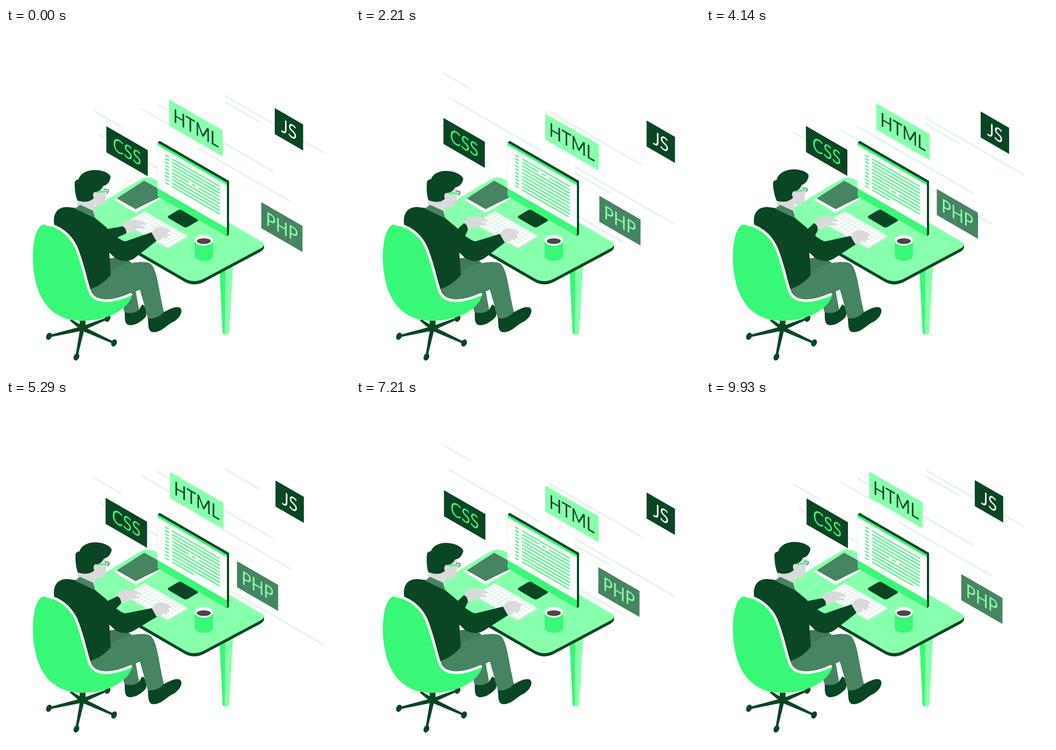
Animation, 640 px wide and 640 px high, one loop 10000 ms. Source, as an HTML page:

```html
<!DOCTYPE html>
<html lang="en">
<head>
<meta charset="utf-8">
<title>Developer at work</title>
<style>
  html, body { margin: 0; width: 100%; height: 100%; overflow: hidden; background: #fff; }
  svg { display: block; width: 100vw; height: 100vh; }
  text { font: 35px Lato, sans-serif; text-anchor: middle; }
  .dark { fill: #0a4524; }
  .mid { fill: #478461; }
  .green { fill: #38f877; }
  .light { fill: #88ffad; }
  .skin { fill: #dadada; }
  .white { fill: #fff; }
  .rail { fill: #e6f4ed; }
</style>
</head>
<body>
<svg viewBox="0 0 640 640">
  <g id="rails"></g>
  <g id="boards"></g>

  <g id="desk">
    <path class="green" d="M397 446 L403 568 Q409 572 415 568 L422 440Z"/>
    <path class="light" d="M408 446 L407 570 Q412 571 415 568 L422 440Z"/>
    <path class="dark" d="M480 404 V409 Q479 413 472 417 L367 473 Q350 481 334 473 L150 367 V350 L300 420Z"/>
    <path class="light" d="M478 399 Q483 406 472 411 L367 467 Q350 475 334 467 L150 360 V342 L250 282 Q262 275 276 281Z"/>
    <path class="white" d="M200 319 L241 344 L300 310 L262 288Z"/>
    <path class="mid" d="M206 317 L257 284 L300 308 L241 337Z"/>
  </g>

  <g id="monitor">
    <path class="dark" d="M303 349 L320 339 Q324 337 328 339 L356 356 Q359 358 355 360 L338 370 Q334 372 330 370 L303 354 Q299 351 303 349Z"/>
    <path class="dark" d="M282 213 L286 210 L415 284.500 V384 L411 387.500Z"/>
    <g transform="matrix(1 .577 0 1 282 213)">
      <rect class="green" width="129" height="100"/>
      <rect class="white" y="5" width="129" height="80"/>
      <path d="M-.3 5V85" stroke="#e0e8e3" stroke-width=".7"/>
      <path id="code" fill="none" stroke="#38f877" stroke-width="2.300"/>
    </g>
  </g>

  <g id="keyboard">
    <path d="M222 363 L258 342 L337 387 V390 L301 411 L222 366Z" fill="#d5eadd"/>
    <path class="white" d="M222 363 L258 341 L337 386.500 L301 408Z"/>
    <path id="keys" fill="none" stroke="#dcefe4" stroke-width="1.300"/>
  </g>

  <g id="mug">
    <path class="green" d="M351 395 V424 C351 436 385 436 385 424 V395Z"/>
    <ellipse class="white" cx="368" cy="395" rx="17" ry="10"/>
    <ellipse cx="368" cy="396.500" rx="13" ry="5.200" fill="#4b4545"/>
  </g>

  <path id="farHand" class="skin" d="M216 374 C216 362 226 357 235 357 C246 356 258 360 261 364 Q262 367 255 366 L246 366 L258 370 Q261 374 253 373 L244 373 Q238 380 222 381Z"/>
  <path id="farArm" class="dark"/>

  <g id="legs">
    <path d="M188 430 C205 424 225 428 234 437 L215 458 L190 456Z" fill="#407a59"/>
    <path class="mid" d="M213 505 L241 488 L248 526 Q236 534 221 530Z"/>
    <path class="dark" d="M221 529 Q236 533 247 525 L253 515 C259 511 265 514 264 521 L260 537 C254 544 243 553 230 553 C220 552 221 540 221 529Z"/>
    <path class="mid" d="M153 487 L195 456 C205 440 255 430 268 438 C282 447 284 490 294 529 Q281 543 264 541 L249 487 L232 494 C205 510 170 515 158 500Z"/>
    <path class="white" d="M242 490 L249 487 L258 518 L254 514 L248 516Z"/>
    <path class="dark" d="M264 540 Q282 542 293 529 C302 525 313 517 323 520 C331 525 324 540 311 547 C300 551 290 566 275 566 C264 566 265 554 264 540Z"/>
  </g>

  <g id="base" class="dark"><path d="M137 540H148V562H137Z"/></g>

  <path class="dark" d="M90 368 C86 345 96 333 114 333 L130 335 L164 352 L188 372 L192 415 L195 459 Q181 478 154 487 C145 440 126 390 90 368Z"/>
  <path id="nearArm" class="dark"/>
  <path id="nearHand" class="skin" d="M271 381 C276 371 284 368 291 370 C302 372 308 377 306 380 L301 380 L304 386 Q302 390 298 385 L300 391 Q297 394 292 388 C290 394 285 396 279 395Z"/>

  <g id="chair">
    <path class="green" d="M69 366 C85 363 116 380 129 407 C143 437 147 472 157 496 C170 517 202 509 235 495 C232 516 201 542 150 544.500 C98 548 61 520 52 455 C46 412 54 369 69 366Z"/>
    <path d="M75 365 C98 368 119 384 130 407 C144 440 149 474 157 493 C168 514 203 509 232 495.500" fill="none" stroke="#fff" stroke-width="5" stroke-linecap="round"/>
  </g>

  <g id="head">
    <path class="skin" d="M133 321 L145 310 L162 298 L181 293 L187 299 C185 312 187 323 181 328 C176 333 169 331 165 329 L165 344 L133 333Z"/>
    <path class="dark" d="M128 291 C127 284 132 282 135 282 C139 268 157 262 174 265 C186 267 195 273 195 278 C193 288 187 293 181 294 Q176 304 168 305 L163 317 C154 325 143 324 133 321 C129 311 128 299 128 291Z"/>
    <ellipse class="skin" cx="166" cy="311" rx="4" ry="6"/>
    <path d="M169 305.500L190 304" fill="none" stroke="#38f877" stroke-width="2.500"/>
    <path d="M183 301Q190 299 191 302Q191 307 187 308" fill="none" stroke="#0a4524"/>
  </g>
  <path class="mid" d="M128 336 L138 329 L162 340 L166 354Z"/>
</svg>

<script>
const HALF = 5, LOOP = 2 * HALF, ISO = Math.tan(Math.PI / 6);
const { sin, cos, min, floor } = Math;
const $ = id => document.getElementById(id);
const place = (el, transform) => el.setAttribute('transform', transform);

function add(parent, tag, attrs, text = '') {
  const el = document.createElementNS('http://www.w3.org/2000/svg', tag);
  for (const k in attrs) el.setAttribute(k, attrs[k]);
  el.textContent = text;
  parent.append(el);
  return el;
}

// Each rail rises, leaves at "out" seconds and returns lower down after a short rest
function rail(x, w, y, out) {
  const el = add($('rails'), 'path', { class: 'rail', d: `M${x} 0l${w} ${w * ISO}v4l${-w} ${-w * ISO}z` });
  const back = 0.1 + out * 1.1;
  return t => {
    const rising = t < out;
    el.setAttribute('visibility', rising || t > back ? 'visible' : 'hidden');
    place(el, `translate(0 ${rising ? y - 31.4 * t : y + 47.3 * (HALF - t)})`);
  };
}
const rails = [
  rail(162, 52, 151, 3.12),
  rail(173, 171, 197, 4.14),
  rail(251, 66, 147.5, 2.17),
  rail(281, 216, 140, 1.32),
  rail(358, 173, 222, 2.6),
  rail(407, 65, 135.5, 0.8),
  rail(407, 185, 124, 0.04)
];

// Isometric sign; drift gives its horizontal offset for a loop angle
function board(text, x, y, w, fill, ink, slope, drift) {
  const el = add($('boards'), 'g', {});
  add(el, 'rect', { class: fill, width: w, height: 48.5 });
  add(el, 'text', { class: ink, x: w / 2, y: 36.8 }, text);
  return a => {
    const dx = drift(a);
    place(el, `matrix(.866 .5 0 1 ${x + dx} ${y + dx * slope})`);
  };
}
const boards = [
  board('CSS', 187, 183, 89, 'dark', 'green', 0.65, a => 13.3 * cos(2 * a + 0.3 + 0.63 * sin(a)) - 13),
  board('HTML', 303.5, 133, 115, 'light', 'dark', 0.535, a => 25 * (1 - cos(2 * a))),
  board('JS', 500, 149, 61, 'dark', 'white', 0.565, a => 21 * (1 - cos(2 * a))),
  board('PHP', 475, 324, 88.5, 'mid', 'light', 0.535, a => 23.5 * (cos(a + 0.2 * sin(a / 2)) - 1))
];

// Code scrolls row by row while the last row is typed; one row per cycle is broken up
const CYCLE = 9, SHOWN = 10;
const plain = [[14, 21], [27, 116]];
const split = [[14, 21], [27, 58], [64, 71], [77, 116]];

function drawCode(t) {
  const pos = t / HALF * CYCLE, top = floor(pos);
  let d = '';
  for (let i = 0; i < SHOWN; i++) {
    const y = 15 + i * 6.4;
    const end = i < SHOWN - 1 ? 116 : 14 + 102 * (pos - top);
    for (const [a, b] of (top + i) % CYCLE === 4 ? split : plain)
      if (a < end) d += `M${a} ${y}H${min(b, end)}`;
  }
  $('code').setAttribute('d', d);
}

function drawKeys() {
  let d = '';
  for (let i = 0; i <= 5; i++) d += `M${227 + i * 6.2} ${363 - i * 3.7}l71 40.5`;
  for (let i = 0; i <= 11; i++) d += `M${227 + i * 6.45} ${363 + i * 3.68}l31 -18.5`;
  $('keys').setAttribute('d', d);
}

// Tapered legs with a caster at each end
function drawBase() {
  for (const [x, y] of [[80, 573.5], [189, 540], [201, 586], [131, 612], [120, 543]]) {
    const dx = x - 142, dy = y - 559, len = Math.hypot(dx, dy), nx = -dy / len, ny = dx / len;
    const at = (px, py, r) => `${px + nx * r} ${py + ny * r}`;
    add($('base'), 'path', { d: `M${at(142, 559, 4)}L${at(x, y, 2)}L${at(x, y, -2)}L${at(142, 559, -4)}Z` });
    if (y !== 543) add($('base'), 'ellipse', { rx: 5, ry: 7, transform: `translate(${x} ${y}) rotate(25)` });
  }
}

function drawMan(t, a) {
  const gap = min(t, HALF - t) / 0.3, reach = 1 - Math.exp(-gap * gap);
  const fx = -16 * reach, fy = -6 * reach;
  place($('farHand'), `translate(${fx} ${fy})`);
  $('farArm').setAttribute('d',
    `M160 350L189 374L${217 + fx} ${369 + fy}Q${224 + fx} ${372 + fy} ${224 + fx} ${382 + fy}L200 393L180 405Z`);

  const x = -3 * sin(a), y = 3.6 * (1 - cos(a));
  place($('nearHand'), `translate(${x} ${y})`);
  $('nearArm').setAttribute('d',
    `M186 376C203 385 212 395 222 397L${271 + x} ${380 + y}Q${280 + x} ${384 + y} ${280 + x} ${396 + y}` +
    `L238 429C226 436 212 434 203 428L186 412Z`);

  place($('head'), `rotate(${1.2 + 4.8 * cos(2 * a - 1.88)} 145 342)`);
}

function frame() {
  const now = performance.now() / 1000 % LOOP;
  const t = now % HALF, a = now / LOOP * 2 * Math.PI;
  for (const draw of rails) draw(t);
  for (const draw of boards) draw(a);
  drawCode(t);
  drawMan(t, a);
  requestAnimationFrame(frame);
}
drawKeys();
drawBase();
frame();
</script>
</body>
</html>
```
